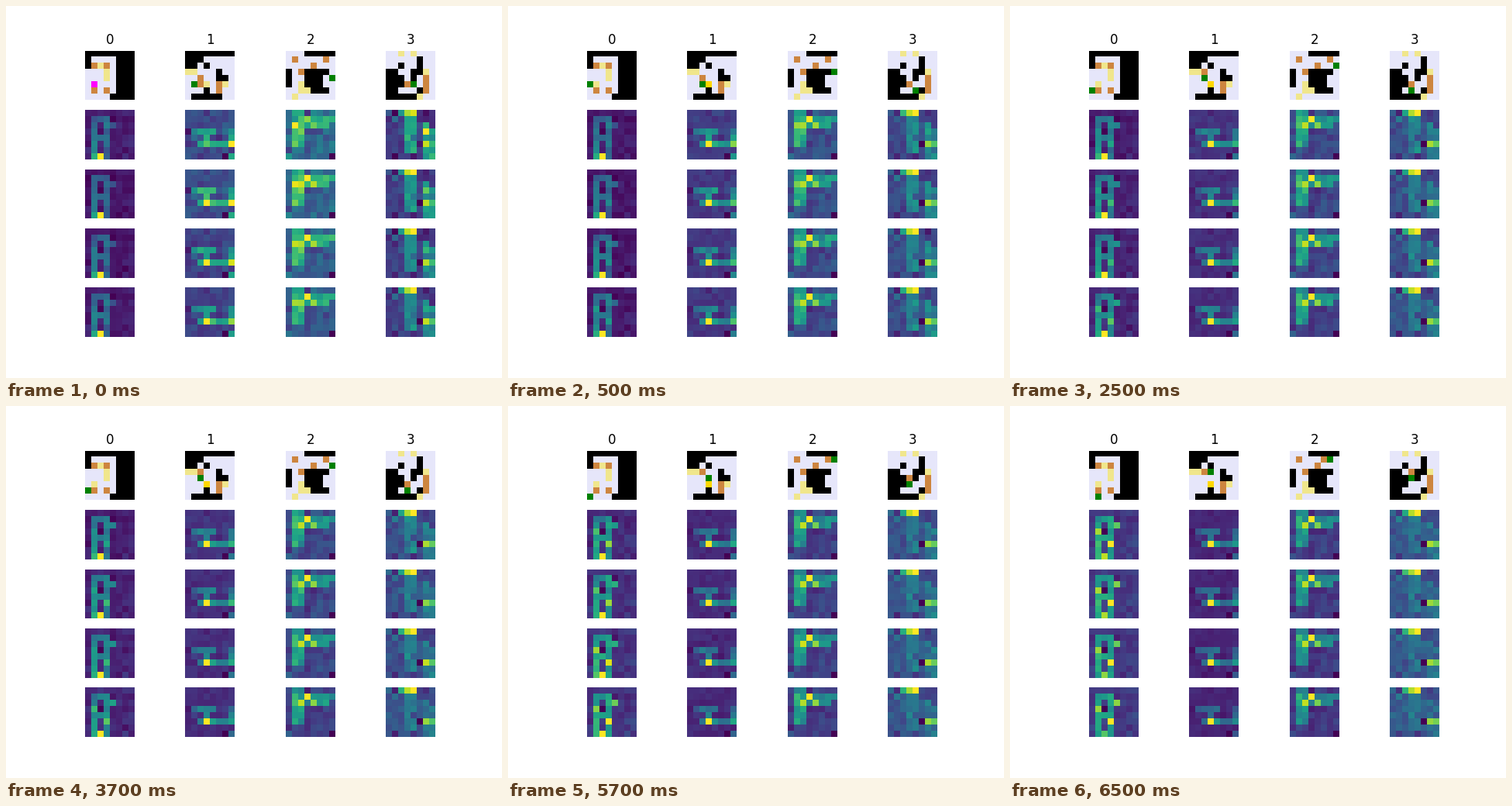
These frames come from a looping animation (640x480 px, 8000 ms). A matplotlib script:

```python
import numpy as np
import matplotlib.pyplot as plt
from matplotlib.animation import FuncAnimation
from matplotlib.colors import to_rgb

SIZE, STEPS, TICKS = 8, 5, 4
MOVES = {"L": (-1, 0), "R": (1, 0), "U": (0, -1), "D": (0, 1)}

# Each level is a box-pushing puzzle; walls are (x, y, width, height).
# Its heat has a base, warm trails and single peaks, all as (early, late).
LEVELS = [
    dict(walls=[(0, 0, 8, 1), (0, 1, 1, 2), (5, 1, 3, 7), (4, 7, 1, 1)],
         goals=[(2, 2), (3, 3), (3, 4), (1, 5)],
         boxes=[(1, 2), (3, 2), (1, 6), (3, 6)],
         agent=(1, 5), path="LDDR",
         base=(.12, .17), warmth=(.38, .55), easing=1.5,
         trails=[[(1, 1), (3, 1), (3, 7), (1, 7), (1, 1)], [(1, 4), (3, 4)]],
         peaks={(2, 7): (1, .8), (1, 7): (.6, .5), (3, 5): (.35, 1),
                (4, 2): (.3, .8), (1, 3): (.4, .85), (2, 3): (.1, 0)}),
    dict(walls=[(0, 0, 8, 1), (0, 1, 3, 1), (0, 2, 2, 1), (3, 2, 1, 1),
                (5, 3, 1, 1), (5, 4, 2, 1), (3, 6, 1, 1), (1, 7, 5, 1)],
         goals=[(0, 3), (1, 3), (3, 5), (6, 5)],
         boxes=[(2, 4), (2, 5), (5, 5), (5, 6)],
         agent=(1, 5), path="RURU",
         base=(.28, .1), warmth=(.62, .35), easing=.4,
         trails=[[(1, 3), (4, 3)], [(3, 4), (3, 5)], [(2, 5), (7, 5), (7, 3)]],
         peaks={(3, 5): (.8, 1), (7, 5): (1, .5), (4, 5): (.65, .52),
                (6, 7): (.1, 0), (7, 7): (.7, .35)}),
    dict(walls=[(3, 0, 5, 1), (0, 3, 1, 3), (3, 3, 3, 3), (6, 3, 1, 1),
                (4, 6, 3, 1)],
         goals=[(2, 5), (2, 6), (3, 6), (1, 7)],
         boxes=[(1, 1), (6, 1), (4, 2), (2, 3)],
         agent=(7, 4), path="UUUL",
         base=(.4, .2), warmth=(.68, .48), easing=.4,
         trails=[[(1, 0), (1, 5), (2, 5), (2, 0)], [(3, 1), (7, 1)],
                 [(3, 2), (6, 2)]],
         peaks={(3, 1): (.85, 1), (2, 2): (.75, .9), (1, 2): (1, .65),
                (4, 2): (.75, .8), (1, 1): (.6, .72), (7, 7): (.1, .05)}),
    dict(walls=[(5, 1, 1, 2), (2, 2, 1, 1), (4, 3, 2, 1), (4, 4, 1, 1),
                (0, 3, 2, 5), (2, 4, 1, 2), (5, 6, 1, 1), (2, 7, 3, 1)],
         goals=[(2, 0), (4, 0), (6, 3), (5, 7)],
         boxes=[(3, 5), (6, 4), (6, 5), (6, 6)],
         agent=(4, 5), path="DLUU",
         base=(.22, .3), warmth=(.6, .42), easing=.4,
         trails=[[(3, 0), (3, 6)], [(4, 0), (4, 6)], [(6, 2), (6, 7)],
                 [(7, 3), (7, 7)]],
         peaks={(3, 0): (.85, .9), (4, 0): (.9, 1), (2, 0): (.5, .65),
                (6, 5): (.8, .8), (7, 5): (.6, .75), (6, 3): (.95, .35),
                (5, 5): (.15, .05)}),
]


def shift(cell, move):
    return cell[0] + move[0], cell[1] + move[1]


def play(level, step):
    """Return the agent and the boxes after the given number of moves."""
    agent, boxes = level["agent"], set(level["boxes"])
    for key in level["path"][:step]:
        agent = shift(agent, MOVES[key])
        if agent in boxes:
            boxes.remove(agent)
            boxes.add(shift(agent, MOVES[key]))
    return agent, boxes


def board(level, step):
    agent, boxes = play(level, step)
    goals = set(level["goals"])
    grid = np.full((SIZE, SIZE, 3), to_rgb("lavender"))

    def paint(cells, color):
        for x, y in cells:
            grid[y, x] = to_rgb(color)

    for x, y, w, h in level["walls"]:
        grid[y:y + h, x:x + w] = 0
    paint(goals, "khaki")
    paint(boxes, "peru")
    paint(boxes & goals, "gold")
    paint([agent], "magenta" if agent in goals else "green")
    return grid


def activation(level, seed, tick):
    progress = (tick / (STEPS * TICKS - 1)) ** level["easing"]

    def blend(pair):
        return pair[0] + (pair[1] - pair[0]) * progress

    heat = np.full((SIZE, SIZE), blend(level["base"]))
    for trail in level["trails"]:
        for (x0, y0), (x1, y1) in zip(trail, trail[1:]):
            rows = slice(min(y0, y1), max(y0, y1) + 1)
            cols = slice(min(x0, x1), max(x0, x1) + 1)
            heat[rows, cols] = blend(level["warmth"])
    for (x, y), pair in level["peaks"].items():
        heat[y, x] = blend(pair)

    fixed = np.random.default_rng(seed).normal(size=heat.shape)
    flicker = np.random.default_rng((seed, tick)).normal(size=heat.shape)
    heat += (.2 * fixed + .1 * flicker) * heat * (1 - heat)
    return (heat - heat.min()) / np.ptp(heat)


fig, axes = plt.subplots(TICKS + 1, len(LEVELS), figsize=(6.4, 4.8), dpi=100)
images = {}
for (row, col), ax in np.ndenumerate(axes):
    ax.axis("off")
    images[row, col] = ax.imshow(np.zeros((SIZE, SIZE)), cmap="viridis",
                                 vmin=0, vmax=1)
    if row == 0:
        ax.set_title(str(col))


def update(frame):
    step = (frame + 3) // 4
    for (row, col), image in images.items():
        level = LEVELS[col]
        if row == 0:
            image.set_data(board(level, step))
        else:
            image.set_data(activation(level, col, TICKS * step + row - 1))
    return list(images.values())


anim = FuncAnimation(fig, update, frames=16, interval=500, repeat=True)
plt.show()
```
